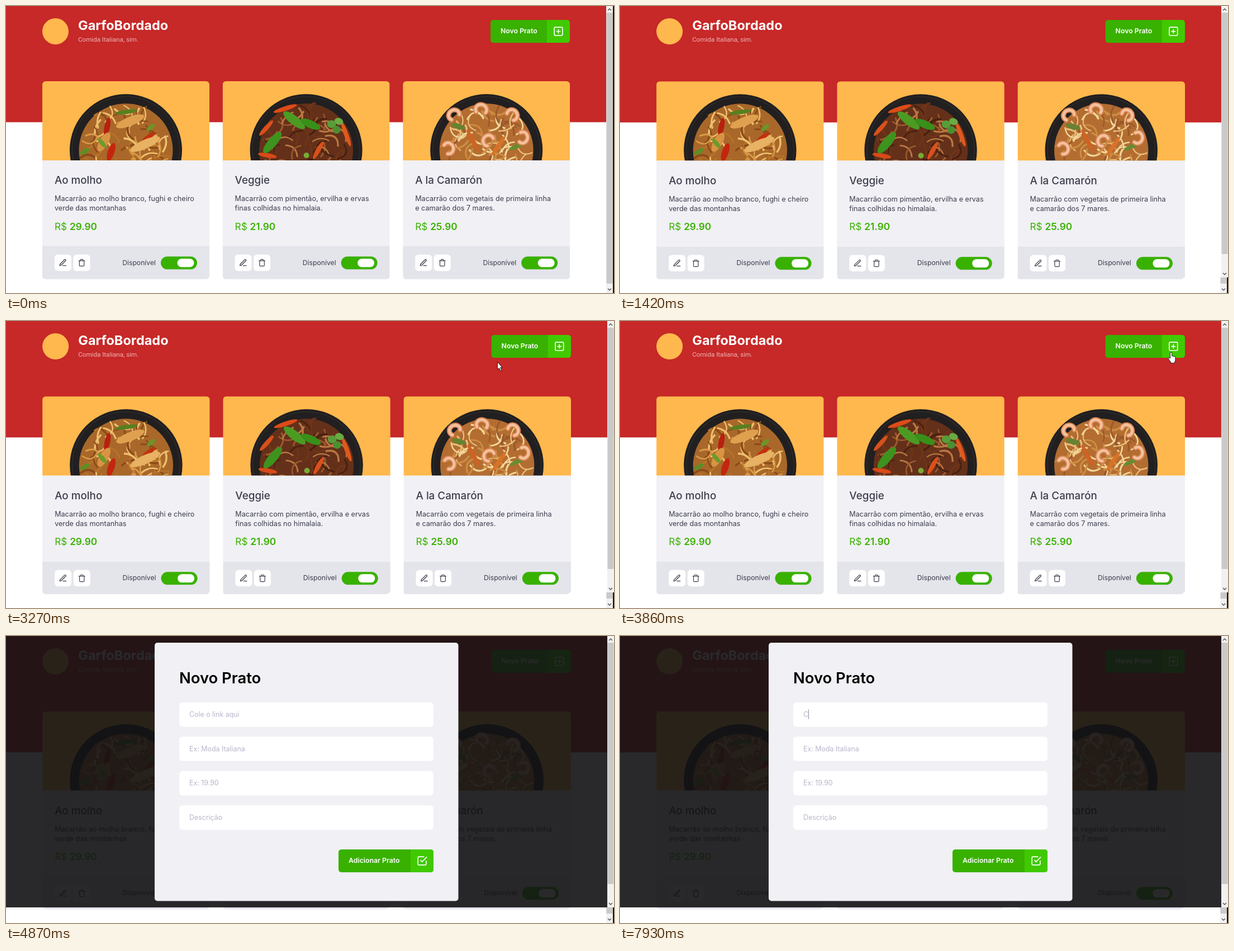
Recreate the animation shown at these times as an HTML page. Size 1088 px wide and 515 px high, loop 8000 ms.

```html
<!DOCTYPE html>
<html lang="pt-BR">
<head>
<meta charset="utf-8">
<title>Novo Prato</title>
<style>
html, body { margin: 0; width: 100%; height: 100%; overflow: hidden; background: #fff; }
svg { display: block; width: 100%; height: 100%; }
text { font-family: Inter, "Open Sans", sans-serif; font-size: 12.6px; fill: #3d3d4d; }
.brand { font-size: 23.5px; font-weight: 700; fill: #fff; }
.tagline { font-family: Roboto, sans-serif; font-size: 11.6px; fill: #efb5b5; }
.action { font-size: 12.3px; font-weight: 600; fill: #fff; }
.dish { font-size: 18.8px; font-weight: 500; }
.price { font-size: 17.2px; fill: #39b100; }
.price tspan { font-weight: 600; }
.status { font-size: 12.2px; }
.heading { font-size: 27.4px; font-weight: 600; fill: #000; }
.hint { font-size: 12.4px; fill: #b7b7cc; }
.icon { fill: none; stroke-linecap: round; stroke-linejoin: round; stroke-width: 2; }

.anim, .anim-pos { animation: 8s step-end infinite; }
.anim { opacity: 0; }
.resized { animation-name: resized; }
.modal { animation-name: modal; }
.caret { animation-name: caret; }
.placeholder { animation-name: placeholder; }
.typed { animation-name: typed; }
.pointer { animation-name: pointer; }
.arrow { animation-name: arrow; }
.hand { animation-name: hand; }
.ibeam { animation-name: ibeam; }

@keyframes resized { 0% { opacity: 0 } 17.75%, 100% { opacity: 1 } }
@keyframes modal { 0% { opacity: 0 } 53%, 100% { opacity: 1 } }
@keyframes caret {
  0% { opacity: 0; transform: none }
  85.625% { opacity: 1; transform: none }
  91.75% { opacity: 0; transform: none }
  99.125%, 100% { opacity: 1; transform: translateX(9px) }
}
@keyframes placeholder { 0% { opacity: 1 } 99.125%, 100% { opacity: 0 } }
@keyframes typed { 0% { opacity: 0 } 99.125%, 100% { opacity: 1 } }
@keyframes arrow {
  0% { opacity: 0 } 27.125% { opacity: 1 } 44.06% { opacity: 0 }
  57.875% { opacity: 1 } 59.875%, 100% { opacity: 0 }
}
@keyframes hand { 0% { opacity: 0 } 44.06% { opacity: 1 } 57.875%, 100% { opacity: 0 } }
@keyframes ibeam { 0% { opacity: 0 } 59.875% { opacity: 1 } 60.875%, 100% { opacity: 0 } }
@keyframes pointer {
  0% { transform: translate(695px, 41px) }
  28% { transform: translate(695px, 61px) }
  28.91% { transform: translate(695px, 61px); animation-timing-function: steps(4) }
  33.25% { transform: translate(741px, 72px); animation-timing-function: steps(7) }
  39.875% { transform: translate(879px, 73px); animation-timing-function: steps(8) }
  48.25% { transform: translate(986px, 56px) }
  57.875% { transform: translate(880px, 82px) }
  58.875% { transform: translate(730px, 116px) }
  59.875%, 100% { transform: translate(614px, 140px) }
}
</style>
</head>
<body>
<script>
const rect = (x, y, w, h, fill, r = 0) =>
  `<rect x="${x}" y="${y}" width="${w}" height="${h}" rx="${r}" fill="${fill}"/>`;
const text = (x, y, cls, content, extra = '') =>
  `<text x="${x}" y="${y}" class="${cls}" ${extra}>${content}</text>`;
const blob = (x, y, rx, ry, turn, fill) =>
  `<ellipse rx="${rx}" ry="${ry}" fill="${fill}" transform="translate(${x} ${y}) rotate(${turn})"/>`;

const iconPaths = {
  plus: 'M5 3h14a2 2 0 0 1 2 2v14a2 2 0 0 1-2 2H5a2 2 0 0 1-2-2V5a2 2 0 0 1 2-2zM12 8v8M8 12h8',
  check: 'M9 11l3 3L22 4M21 12v7a2 2 0 0 1-2 2H5a2 2 0 0 1-2-2V5a2 2 0 0 1 2-2h11',
  pencil: 'M12 20h9M16.5 3.5a2.1 2.1 0 0 1 3 3L7 19l-4 1 1-4z',
  trash: 'M3 6h18M19 6v14a2 2 0 0 1-2 2H7a2 2 0 0 1-2-2V6M8 6V4a2 2 0 0 1 2-2h4a2 2 0 0 1 2 2v2'
};
const icon = (name, x, y, scale, color) =>
  `<path class="icon" d="${iconPaths[name]}" stroke="${color}"
    transform="translate(${x} ${y}) scale(${scale}) translate(-12 -12)"/>`;

function random(seed) {
  return () => (seed = seed * 16807 % 2147483647) / 2147483647;
}

// Short bent strands scattered inside the bowl
function noodles(seed, colors) {
  const next = random(seed);
  let out = '';
  for (let i = 0; i < 75; i++) {
    const angle = next() * 6.283, dist = Math.sqrt(next()) * 72;
    const x = 149.5 + dist * Math.cos(angle), y = 121 + dist * Math.sin(angle);
    const turn = next() * 360, bend = 6 + next() * 14;
    out += `<path d="M-15 0Q0 ${-bend} 15 0" fill="none" stroke="${colors[i % colors.length]}"
      stroke-width="${2 + next() * 1.6}" transform="translate(${x} ${y}) rotate(${turn})"/>`;
  }
  return out;
}

const shrimp = (x, y, turn) =>
  `<g fill="none" stroke-linecap="round" transform="translate(${x} ${y}) rotate(${turn})">
    <path d="M-8 6A10 9 0 1 1 9 5" stroke="#d98250" stroke-width="9"/>
    <path d="M-8 6A10 9 0 1 1 9 5" stroke="#f3c19d" stroke-width="5"/></g>`;

const dishes = [
  {
    name: 'Ao molho', price: '29.90',
    lines: ['Macarrão ao molho branco, fughi e cheiro', 'verde das montanhas'],
    base: '#a9682a', strands: ['#d99b48', '#efc06f', '#b87329', '#8a4a18'],
    toppings: blob(116, 82, 5, 17, 12, '#b8200f') + blob(123, 127, 6, 17, 18, '#c3260f') +
      blob(190, 100, 14, 4, -35, '#c2310f') + blob(157, 72, 27, 8, -22, '#dfa14f') +
      blob(184, 113, 29, 8, -24, '#e7b263') + blob(110, 109, 8, 19, 30, '#d89343') +
      blob(150, 55, 20, 4, -8, '#587f20') + blob(107, 111, 11, 4, 50, '#6e9a2a') +
      blob(76, 126, 10, 4, -30, '#5f8d25') + blob(194, 83, 9, 4, -40, '#6d9429')
  },
  {
    name: 'Veggie', price: '21.90',
    lines: ['Macarrão com pimentão, ervilha e ervas', 'finas colhidas no himalaia.'],
    base: '#64301a', strands: ['#9a592d', '#b97843', '#713517', '#48200f'],
    toppings: blob(78, 84, 18, 4, -48, '#d9501b') + blob(112, 49, 22, 4, -18, '#dd4b18') +
      blob(171, 124, 18, 4, -60, '#db501c') + blob(221, 95, 23, 4, 70, '#e0581e') +
      blob(80, 133, 17, 4, 10, '#d94919') + blob(128, 70, 24, 8, 38, '#4b9b23') +
      blob(157, 77, 19, 7, 24, '#389019') + blob(89, 110, 24, 8, -50, '#3d931d') +
      blob(195, 77, 8, 7, 0, '#579d38') + blob(208, 72, 8, 6, 20, '#68ac42') +
      blob(204, 87, 7, 7, 0, '#4b8f31') + blob(150, 133, 5, 5, 0, '#79a934')
  },
  {
    name: 'A la Camarón', price: '25.90',
    lines: ['Macarrão com vegetais de primeira linha', 'e camarão dos 7 mares.'],
    base: '#b36d31', strands: ['#e9bd79', '#f2d69b', '#cd8d43', '#9b592b'],
    toppings: blob(125, 106, 22, 4, 62, '#cf6322') + blob(99, 81, 13, 5, 15, '#688231') +
      blob(171, 116, 21, 4, -55, '#d87328') + blob(205, 116, 17, 4, -25, '#698b32') +
      shrimp(91, 60, -30) + shrimp(140, 50, 10) + shrimp(196, 60, 50) +
      shrimp(215, 101, 100) + shrimp(152, 106, -50) + shrimp(82, 120, 70)
  }
];

const card = (dish, i) => `<g transform="translate(${65 + i * 322.6} 135)" clip-path="url(#card)">
  ${rect(0, 0, 299, 142, '#ffb84d')}
  <g clip-path="url(#photo)">
    <circle cx="149.5" cy="123.5" r="100.5" fill="#211f20"/>
    <circle cx="149.5" cy="123.5" r="96" fill="none" stroke="#34302e"/>
    <circle cx="149.5" cy="124" r="84" fill="${dish.base}"/>
    ${noodles(41 + i * 97, dish.strands)}${dish.toppings}
  </g>
  ${rect(0, 142, 299, 154, '#f0f0f5')}${rect(0, 296, 299, 60, '#e4e4eb')}
  ${text(22, 184, 'dish', dish.name)}
  ${dish.lines.map((line, n) => text(22, 215 + n * 17.4, '', line)).join('')}
  ${text(22, 266.5, 'price', `R$ <tspan>${dish.price}</tspan>`)}
  ${rect(22, 311, 30, 29.5, '#fff', 6)}${rect(55.5, 311, 30, 29.5, '#fff', 6)}
  ${icon('pencil', 36.8, 325.7, 0.64, '#3d3d4d')}${icon('trash', 70.5, 325.7, 0.6, '#3d3d4d')}
  ${text(203, 329.5, 'status', 'Disponível', 'text-anchor="end"')}
  ${rect(212, 314.5, 65, 23, '#39b100', 11.5)}${rect(241.5, 318.5, 30, 15, '#fff', 7.5)}
</g>`;

const button = (x, y, width, label, name) => `
  ${rect(x, y, width, 41, '#39b100', 5)}
  <path d="M${x + width - 41} ${y}h36a5 5 0 0 1 5 5v31a5 5 0 0 1-5 5h-36z" fill="#41c900"/>
  ${text(x + 18, y + 24, 'action', label)}${icon(name, x + width - 20.5, y + 20.5, 0.82, '#fff')}`;

const page = `<g id="page">
  ${rect(0, 0, 1074, 600, '#fff')}${rect(0, 0, 1074, 208.5, '#c72828')}
  <circle cx="88.5" cy="45.5" r="23.5" fill="#ffb84d"/>
  ${text(129, 42.5, 'brand', 'GarfoBordado')}
  ${text(129, 63.5, 'tagline', 'Comida Italiana, sim.')}
  ${button(867, 25, 142, 'Novo Prato', 'plus')}
  ${dishes.map(card).join('')}
</g>`;

const scrollbar = (x, height, thumbEnd) => `
  ${rect(x, 0, 12, height, '#f1f1f1')}${rect(x + 0.5, 12, 11, thumbEnd - 12, '#c9c9c9')}
  <path d="M${x + 3} 8l3-3 3 3M${x + 3} ${height - 8}l3 3 3-3" fill="none" stroke="#505050" stroke-width="1.4"/>`;

const hints = ['Cole o link aqui', 'Ex: Moda Italiana', 'Ex: 19.90', 'Descrição'];
const field = (hint, i) => rect(310, 119 + i * 61.6, 455, 44, '#fff', 6) +
  text(328, 145 + i * 61.6, i ? 'hint' : 'hint anim placeholder', hint);

const modal = `<g class="anim modal">
  ${rect(0, 0, 1076, 487, '#121214e6')}
  ${rect(266, 12, 543.5, 463.5, '#f0f0f5', 5)}
  ${text(310, 85, 'heading', 'Novo Prato')}
  ${hints.map(field).join('')}
  ${text(328, 145, 'hint anim typed', 'C')}
  <g class="anim caret">${rect(328, 132, 1, 17, '#8c8c9c')}</g>
  ${button(595, 383, 170, 'Adicionar Prato', 'check')}
</g>`;

const pointer = `<g class="anim-pos pointer" fill="#fff" stroke="#111" stroke-linejoin="round" stroke-width="0.9">
  <path class="anim arrow" d="M.5 .5V14l3-2.8 2.2 5 2.2-1-2.2-4.8H9z"/>
  <path class="anim hand" d="M-1.5 11V1.8a1.6 1.6 0 0 1 3.2 0V7q1.4-.9 2.4.5 1.4-.7 2 .6 1.8-.5 1.8 1.4v4q0 2.4-1.5 4v2H-.4v-2Q-3 15-4.6 11.5q-.3-2 1.3-1.8z"/>
  <path class="anim ibeam" d="M-2.5 -7.5h5M0 -7.5v15M-2.5 7.5h5"/>
</g>`;

document.body.innerHTML = `<svg viewBox="0 0 1088 515" preserveAspectRatio="none">
  <defs>
    <clipPath id="card"><rect width="299" height="355.3" rx="6"/></clipPath>
    <clipPath id="photo"><rect width="299" height="142"/></clipPath>
    <clipPath id="window"><rect width="1088" height="487"/></clipPath>
  </defs>
  ${page}${scrollbar(1074, 515, 498)}${rect(1086, 0, 2, 515, '#111')}
  <g class="anim resized" clip-path="url(#window)">
    <use href="#page" transform="scale(1.0018)"/>
    ${scrollbar(1076, 487, 445)}
  </g>
  ${modal}${pointer}
</svg>`;
</script>
</body>
</html>
```
